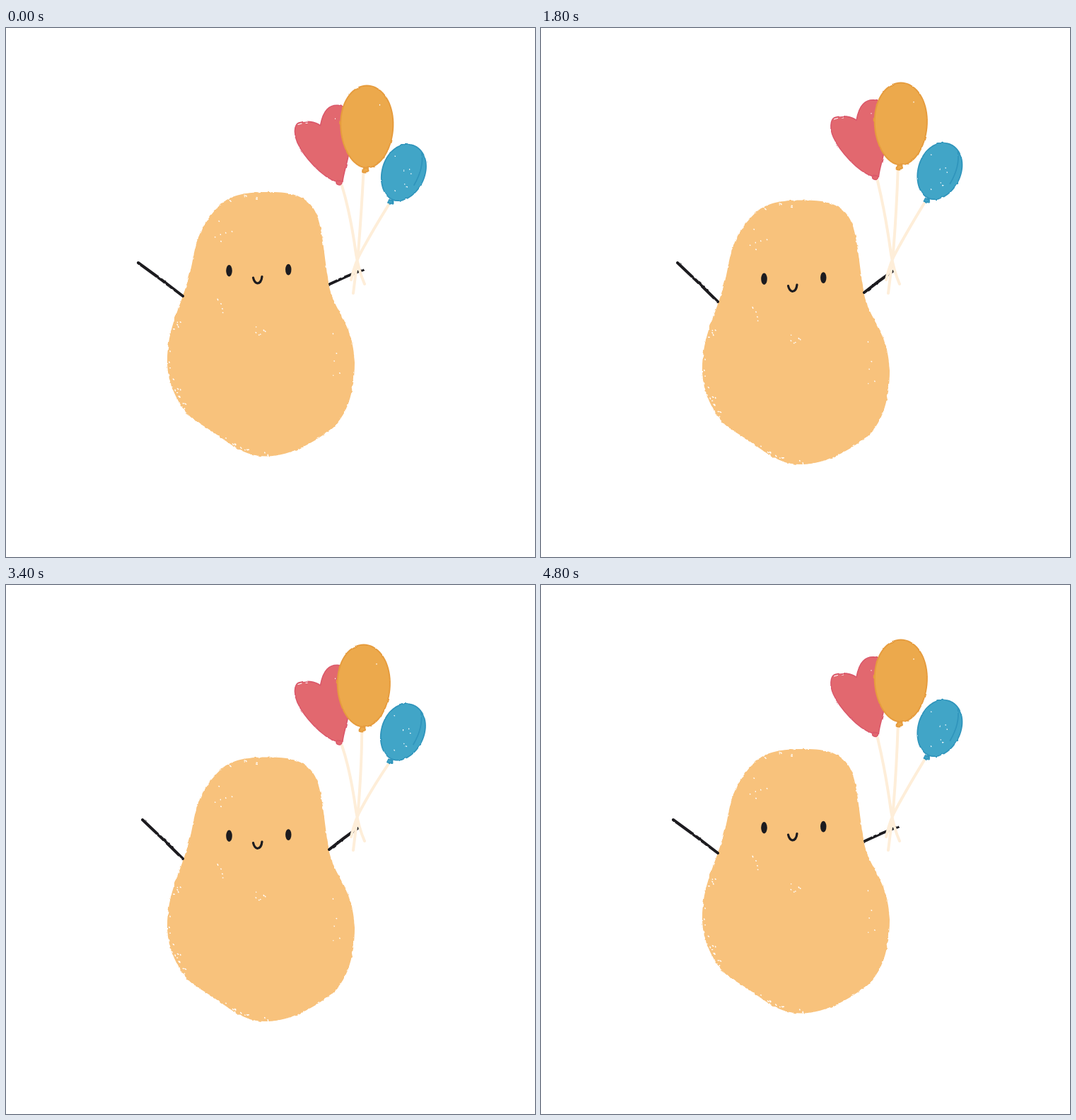
An HTML page for the animation above (5.01 s loop, 748 by 748 pixels).

```html
<!DOCTYPE html>
<html lang="en">
<head>
<meta charset="utf-8">
<title>Potato with balloons</title>
<style>
  html, body { margin: 0; width: 100%; height: 100%; overflow: hidden; background: #fff; }
  svg { display: block; width: 100%; height: 100%; }
</style>
</head>
<body>
<svg viewBox="0 0 748 748" fill="none" stroke-linecap="round" stroke-linejoin="round">
  <defs>
    <filter id="rough" filterUnits="userSpaceOnUse" x="0" y="0" width="748" height="748" color-interpolation-filters="sRGB">
      <feTurbulence type="fractalNoise" baseFrequency=".16" numOctaves="2" seed="4"/>
      <feDisplacementMap in="SourceGraphic" scale="3.4" xChannelSelector="R" yChannelSelector="G"/>
    </filter>
    <filter id="soft" filterUnits="userSpaceOnUse" x="0" y="0" width="748" height="748" color-interpolation-filters="sRGB">
      <feTurbulence type="fractalNoise" baseFrequency=".1" numOctaves="2" seed="9"/>
      <feDisplacementMap in="SourceGraphic" scale="2.4" xChannelSelector="R" yChannelSelector="G"/>
    </filter>
  </defs>

  <g id="body">
    <path id="skin" fill="#f8c27c" filter="url(#rough)" d="M370 232C400 231.500 425 236 437 259C448 281 449 318 455 352
      C459 400 491 412 493 473C493 510 484 545 463 564C440 584 402 606 368 605.500C330 606 312 581 270 557
      C244 541 228 500 228 472C228 422 248 394 259 350C268 322 263 288 305 248C322 234 346 232 370 232Z"/>
    <path id="specks" stroke="#fff" stroke-width="1.4"/>
  </g>
  <g id="face">
    <ellipse cx="315.5" cy="343.3" rx="4.3" ry="8.2" fill="#1c1b1f"/>
    <ellipse cx="399.3" cy="341.6" rx="4.2" ry="7.9" fill="#1c1b1f"/>
    <path d="M349.500 353Q351 360 355.500 361Q361 360.500 362 351.500" stroke="#1c1b1f" stroke-width="3.2"/>
  </g>

  <path id="arms" stroke="#1c1b1f" stroke-width="4" filter="url(#soft)"/>
  <path id="strings" stroke="#feeed9" stroke-width="4"/>

  <g id="heart" filter="url(#soft)">
    <g fill="#e2686f" stroke="#da586a" stroke-width="1.6">
      <path d="M444.500 138C437 132 424 131 414 134C407 137 407 151 412 162C421 182 447 211 467 217L476 217C477 205 484 187 486 170L486 118C476 107 462 107 454 115C448 121 446 130 444.500 138Z"/>
      <ellipse cx="471.500" cy="218.500" rx="4.5" ry="3.4"/>
    </g>
    <path d="M413 136.500l5-1.500M424 134.500h2M465.500 128v.5" stroke="#fff" stroke-width="1.2"/>
  </g>
  <g id="gold" filter="url(#soft)">
    <g fill="#eca94c" stroke="#e69c3e" stroke-width="2">
      <path id="goldSkin"/>
      <path d="M506 198L505 202.500Q509 204.500 512.500 202L511.500 198Z"/>
    </g>
    <path d="M528.500 108.500v.5" stroke="#fff" stroke-width="1.3"/>
  </g>
  <g id="blue" filter="url(#soft)">
    <g fill="#41a5c7" stroke="#3095bc" stroke-width="1.8">
      <path id="blueSkin"/>
      <path d="M542 243L540 247L547.500 248.500L547.500 244Z"/>
      <path d="M588 177Q591 198 577 222" fill="none"/>
    </g>
    <path id="blueSpecks" stroke="#fff" stroke-width="1.3"/>
  </g>
</svg>

<script>
const LOOP = 5010;
const $ = id => document.getElementById(id);
const draw = (id, d) => $(id).setAttribute('d', d);
const start = performance.now();

function random(seed) {
  return () => (seed = seed * 16807 % 2147483647) / 2147483647;
}
const rnd = random(77);

// Oval that narrows towards the bottom, tilted by an angle in radians
function egg(cx, cy, rx, ry, taper, tilt = 0) {
  const pts = [];
  for (let a = 0; a < 2 * Math.PI; a += Math.PI / 36) {
    const y = Math.sin(a), x = Math.cos(a) * rx * (1 - taper * y), v = y * ry;
    pts.push([cx + x * Math.cos(tilt) - v * Math.sin(tilt), cy + x * Math.sin(tilt) + v * Math.cos(tilt)]);
  }
  return 'M' + pts.join('L') + 'Z';
}

const dot = (x, y, size) =>
  `M${x.toFixed(1)} ${y.toFixed(1)}l${(rnd() * size).toFixed(1)} ${(rnd() * size).toFixed(1)}`;

// Dots spread evenly over an oval
function scatter(count, cx, cy, rx, ry) {
  let d = '';
  for (let i = 0; i < count; i++) {
    const a = rnd() * 2 * Math.PI, r = Math.sqrt(rnd());
    d += dot(cx + rx * r * Math.cos(a), cy + ry * r * Math.sin(a), .7);
  }
  return d;
}

// Dots just inside a stretch of the body outline
function rim(count, from, to, depth) {
  const skin = $('skin'), len = skin.getTotalLength();
  let d = '';
  for (let i = 0; i < count; i++) {
    const p = skin.getPointAtLength(len * (from + (to - from) * rnd()));
    const dx = 360 - p.x, dy = 430 - p.y;
    const k = (2 + depth * rnd() ** 2) / Math.hypot(dx, dy);
    d += dot(p.x + dx * k, p.y + dy * k, 1.7);
  }
  return d;
}

draw('goldSkin', egg(510.3, 139.5, 37, 58, .06));
draw('blueSkin', egg(561.8, 204.5, 30, 41, .05, .36));
draw('blueSpecks', scatter(7, 556, 202, 18, 30));
draw('specks',
  scatter(7, 355, 427, 12, 9) + scatter(6, 308, 290, 14, 22) + scatter(5, 300, 400, 9, 19) +
  scatter(5, 466, 465, 16, 45) +
  rim(10, .49, .56, 8) + rim(18, .62, .76, 9) + rim(6, .94, .99, 10));

// Lift of body and face; each arm runs from shoulder to hand
const poses = [
  { body: 0, face: 0, left: [[250, 379], [187, 332]], right: [[458, 362], [504, 342]] },
  { body: 11.5, face: 11.5, left: [[250, 387], [193, 332]], right: [[457, 374], [497, 344]] },
  { body: -12, face: -12, left: [[251, 365], [181, 328]], right: [[457, 350], [505, 335]] },
  { body: -24, face: -12, left: [[256, 342], [199, 287]], right: [[458, 337], [501, 309]] }
];

// Balloon offsets
const rest = { heart: [0, 0], gold: [0, 0], blue: [0, 0] };
const low = { heart: [0, 4], gold: [-4.5, 3], blue: [-1, 3.5] };
const high = { heart: [1.5, -7.5], gold: [-1.5, -4], blue: [1.5, -2] };

const move = (id, x, y) => $(id).setAttribute('transform', `translate(${x} ${y})`);

function arm([[x1, y1], [x2, y2]]) {
  return `M${x1} ${y1}Q${(x1 + x2) / 2} ${(y1 + y2) / 2 - 1} ${x2} ${y2}`;
}

function render(time) {
  const t = Math.min(time % LOOP, 4999);
  const pose = poses[Math.floor(t / 200) % 4];
  move('body', 0, pose.body);
  move('face', 0, pose.face);
  draw('arms', arm(pose.left) + arm(pose.right));

  const beat = t % 1000;
  const float = beat >= 800 ? high : beat >= 300 && beat < 500 ? low : rest;
  for (const id in float) move(id, ...float[id]);

  const top = (id, x, y) => `M${x + float[id][0] / 2} ${y + float[id][1]}`;
  draw('strings',
    top('heart', 475, 223) + 'Q487 262 495 320Q499 344 507 362' +
    top('gold', 505.5, 203) + 'Q503 255 498 318L491 375' +
    top('blue', 541, 250) + 'Q518 287 503 315Q494 330 488 356');
}

function tick() {
  render(performance.now() - start);
  requestAnimationFrame(tick);
}
tick();
</script>
</body>
</html>
```
